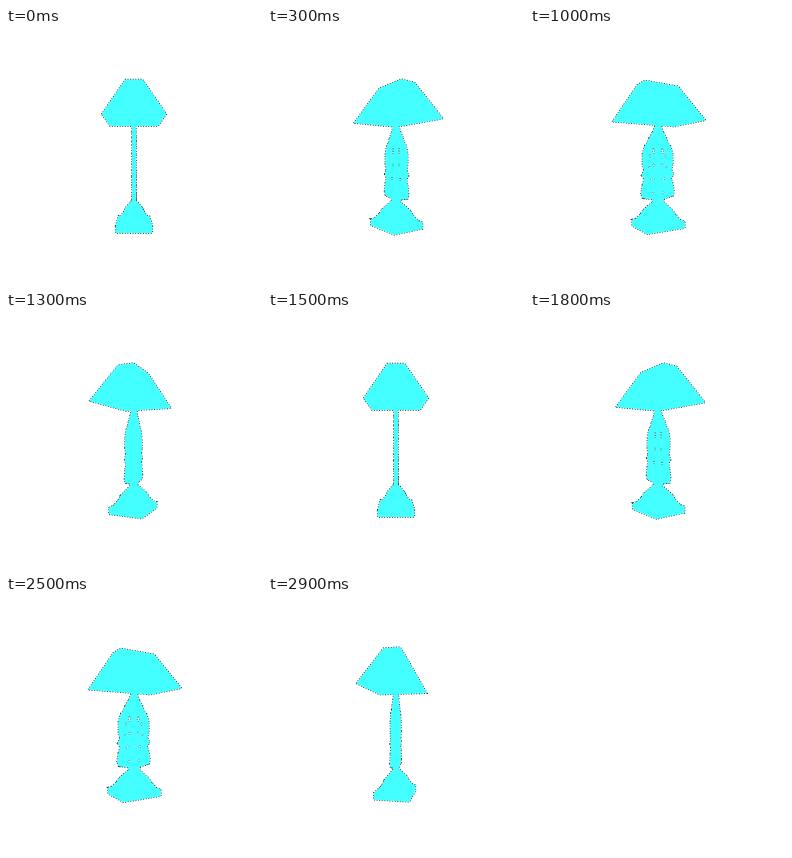
Animation, 256 px wide and 256 px high, one loop 3000 ms. Source, as an HTML page:

```html
<!DOCTYPE html>
<html lang="en">
<head>
<meta charset="utf-8">
<title>Turning lamp</title>
<style>
  html, body { margin: 0; width: 100%; height: 100%; overflow: hidden; background: #fff; }
  svg { display: block; width: 100vw; height: 100vh; }
  .edge { fill: none; stroke: #111; stroke-width: 1.3; stroke-dasharray: 1 1.6; }
  #body { fill: #43ffff; }
  #holes { fill: #fff; stroke: #222; stroke-width: .6; stroke-dasharray: 1 1.5; }
</style>
</head>
<body>
<svg viewBox="0 0 256 256">
  <path id="rim" class="edge"/>
  <path id="body"/>
  <path id="holes"/>
</svg>
<script>
const LOOP = 3000, STEP = 100;
const CX = 128, CY = 132, DEPTH = 253, THICK = 1.9;

// Each part is a stack of rectangles: [half width, half depth, height below eye level]
const shade = [[8, 19, -74.5], [27.6, 38, -39]];
const post = [
  [1.5, -36], [5, -28], [9, -22], [10.5, -18], [14, -14], [16.5, -6],
  [16.5, 4], [15, 10], [17.5, 15], [14.5, 19], [16.5, 24], [18, 33],
  [16.5, 37], [6, 39], [4, 44]
].map(([b, h]) => [THICK, b, h]);
const foot = [[3, 5, 42], [9, 12, 50], [10.5, 14, 54], [14, 18, 59.5], [16.9, 20.8, 60.5], [16.9, 20.8, 67]];

// Openings in the post: [offset from the middle, height, half width, half height]
const holes = [
  [5, -9, 1.7, 2.6], [9, -4, 1.3, 1.6], [5, 5, 1.6, 1.2],
  [10, 7, 1.2, 1], [7, 19, 1.8, 1.4], [6, 33, 1.3, 1]
];

const $ = id => document.getElementById(id);
const fix = n => n.toFixed(2);

function project(x, z, h, turn) {
  const c = Math.cos(turn), s = Math.sin(turn);
  const scale = DEPTH / (DEPTH - (z * c - x * s));
  return [CX + (x * c + z * s) * scale, CY + h * scale];
}

function corners([a, b, h], turn) {
  return [[a, b], [a, -b], [-a, -b], [-a, b]].map(([x, z]) => project(x, z, h, turn));
}

function hull(points) {
  const cross = (o, p, q) => (p[0] - o[0]) * (q[1] - o[1]) - (p[1] - o[1]) * (q[0] - o[0]);
  const chain = list => {
    const out = [];
    for (const p of list) {
      while (out.length > 1 && cross(out.at(-2), out.at(-1), p) <= 0) out.pop();
      out.push(p);
    }
    return out.slice(0, -1);
  };
  const sorted = [...points].sort((p, q) => p[0] - q[0] || p[1] - q[1]);
  return [...chain(sorted), ...chain([...sorted].reverse())];
}

const polygon = pts => "M" + pts.map(p => p.map(fix).join(" ")).join("L") + "Z";

function stack(rows, turn) {
  return rows.slice(1).map((row, i) =>
    polygon(hull([...corners(rows[i], turn), ...corners(row, turn)]))).join("");
}

// The thickness of the post closes an opening as it turns edge-on
function opening([z, h, w, tall], turn) {
  const wide = w * Math.abs(Math.sin(turn)) - THICK * .35 * Math.abs(Math.cos(turn));
  if (wide < .3) return "";
  const [x, y] = project(0, z, h, turn);
  return polygon([[x, y - tall], [x + wide, y], [x, y + tall], [x - wide, y]]);
}

function draw(time) {
  const step = Math.floor((time % LOOP) / STEP);
  const turn = step * STEP / LOOP * 2 * Math.PI;
  const outline = [shade, post, foot].map(part => stack(part, turn)).join("");
  $("rim").setAttribute("d", outline);
  $("body").setAttribute("d", outline);
  $("holes").setAttribute("d", holes.map(([z, ...rest]) =>
    opening([z, ...rest], turn) + opening([-z, ...rest], turn)).join(""));
}

const start = performance.now();
function tick() {
  draw(performance.now() - start);
  requestAnimationFrame(tick);
}
tick();
</script>
</body>
</html>
```
